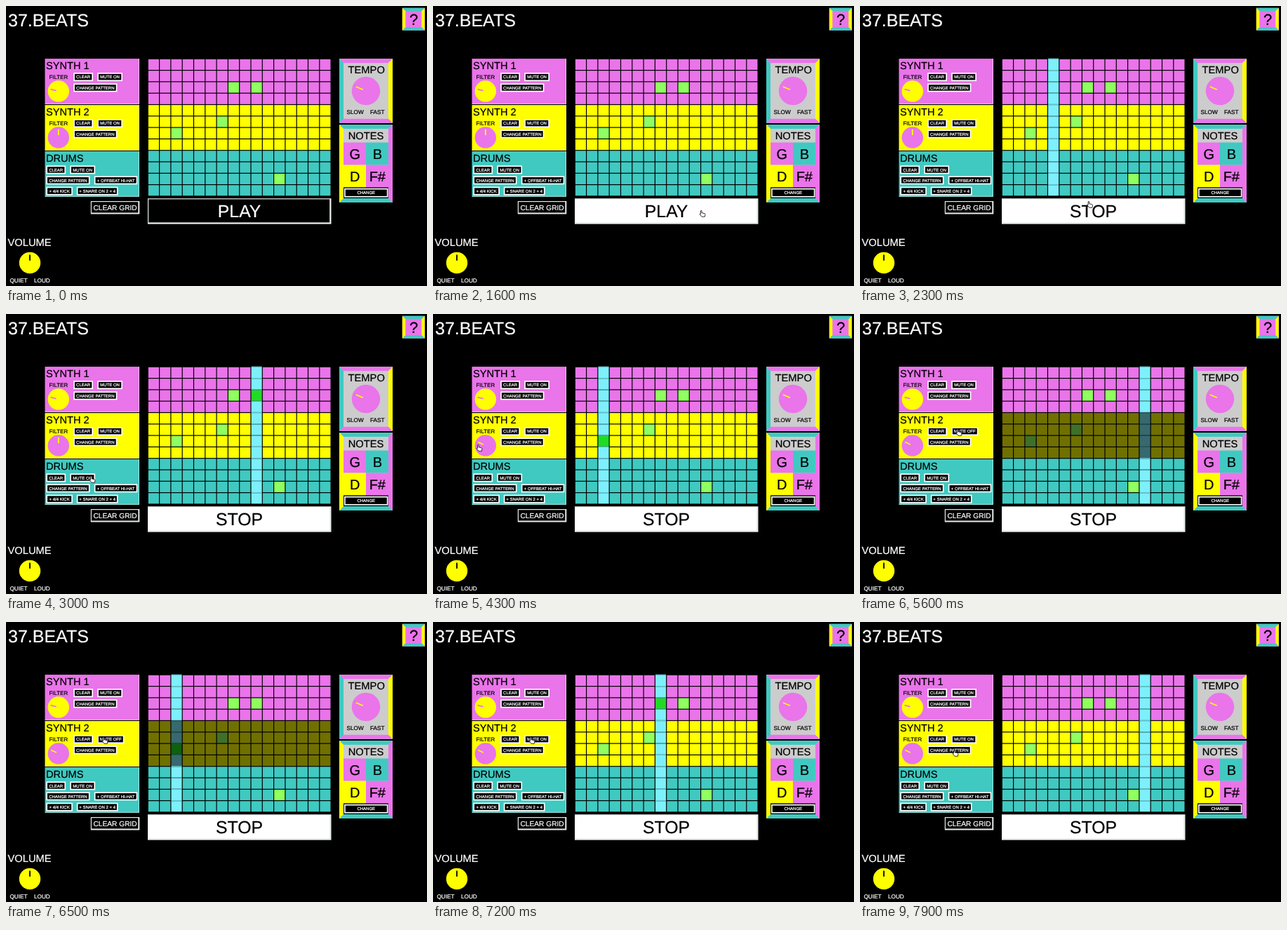
Write an HTML page that moves like this. It is 600 by 399 pixels and loops after 8 s.

```html
<!DOCTYPE html>
<html lang="en">
<head>
<meta charset="utf-8">
<title>Step sequencer</title>
<style>
  html, body { margin: 0; width: 100%; height: 100%; overflow: hidden; background: #000; }
  svg { display: block; width: 100%; height: 100%; }
  text {
    font-family: "Liberation Sans", Arial, sans-serif;
    text-rendering: geometricPrecision;
    stroke-width: .22px;
  }
</style>
</head>
<body>
<svg id="stage" viewBox="0 0 600 399"></svg>
<script>
const PINK = '#ea74ea', YELLOW = '#ffff00', TEAL = '#40c9c1', GREY = '#cccccc';
const NOTE = '#90ff60', HIT = '#1fdc22', BEAM = '#7df0fb';
const LOOP = 8000, TICK = 100;
const STEP = 140, PLAY_AT = 1660, MUTE_AT = 5200, UNMUTE_AT = 7000;
const stage = document.getElementById('stage');

function add(tag, attrs, parent = stage) {
  const el = document.createElementNS('http://www.w3.org/2000/svg', tag);
  for (const key in attrs) el.setAttribute(key, attrs[key]);
  parent.appendChild(el);
  return el;
}

const rect = (x, y, width, height, fill, parent) => add('rect', { x, y, width, height, fill }, parent);

function label(str, x, y, size, fill = '#000', anchor = 'start') {
  const el = add('text', { x, y, 'font-size': size, fill, stroke: fill, 'text-anchor': anchor });
  el.textContent = str;
  return el;
}

// Small black button with a white frame
const EDGE = 1.7;
function button(str, x, y, w, h = 12) {
  const frame = rect(x, y, w, h, '#fff');
  const face = rect(x + EDGE, y + EDGE, w - 2 * EDGE, h - 2 * EDGE, '#000');
  const text = label(str, x + w / 2, y + h / 2 + 2.2, 6, '#fff', 'middle');
  return { frame, face, text };
}

function panel(y, fill, title) {
  rect(55.5, y, 134.5, 64.8, fill);
  add('path', { d: `M189.5 ${y}v64.3H55.5`, fill: 'none', stroke: '#fff', 'stroke-opacity': 0.55 });
  label(title, 57, y + 14.5, 14.6);
}

function knob(cx, cy, r, fill, mark, angle) {
  add('circle', { cx, cy, r, fill });
  const needle = add('path', { d: `M0${-r * 0.76}V${-r * 0.22}`, stroke: mark, 'stroke-width': 1.8 });
  const turn = a => needle.setAttribute('transform', `translate(${cx} ${cy}) rotate(${a})`);
  turn(angle);
  return turn;
}

// Mitred frame: one colour per side, in CSS order
function bevel(x, y, w, h, b, colors) {
  const r = x + w, d = y + h;
  [
    [x, y, r, y, r - b, y + b, x + b, y + b],
    [r, y, r, d, r - b, d - b, r - b, y + b],
    [x, d, r, d, r - b, d - b, x + b, d - b],
    [x, y, x, d, x + b, d - b, x + b, y + b]
  ].forEach((points, i) => add('polygon', { points: points.join(' '), fill: colors[i] }));
}

function synth(y, title, knobFill, fill, mark, angle) {
  panel(y, fill, title);
  label('FILTER', 61.5, y + 28.8, 7.9);
  const turn = knob(74.8, y + 46.3, 15.2, knobFill, mark, angle);
  button('CLEAR', 96.2, y + 20, 27.8);
  const mute = button('MUTE ON', 130.2, y + 20, 35.8);
  button('CHANGE PATTERN', 96.2, y + 35.3, 62.2);
  return { turn, mute };
}

rect(0, 0, 600, 399, '#000');
label('37.BEATS', 3, 28.8, 25, '#fff');

rect(564.8, 2.8, 32, 32, PINK);
bevel(564.8, 2.8, 32, 32, 4.5, [TEAL, YELLOW, TEAL, YELLOW]);
label('?', 581, 27, 22, '#000', 'middle');

synth(75.1, 'SYNTH 1', YELLOW, PINK, PINK, -76);
const synth2 = synth(141.1, 'SYNTH 2', PINK, YELLOW, YELLOW, 0);

panel(207, TEAL, 'DRUMS');
button('CLEAR', 57.3, 227.4, 27.8);
button('MUTE ON', 91.3, 227.4, 35.8);
button('CHANGE PATTERN', 57.3, 242.3, 62.2);
button('+ OFFBEAT HI-HAT', 125.8, 242.3, 61.6);
button('+ 4/4 KICK', 57.3, 257.6, 37.6);
button('+ SNARE ON 2 + 4', 100.8, 257.6, 58.8);

rect(120.8, 278, 69.5, 18.5, '#e6ecea');
rect(122, 279.2, 66.3, 15.3, '#000');
label('CLEAR GRID', 155.6, 290.5, 10.2, '#fff', 'middle');

label('VOLUME', 2.5, 341.6, 14.7, '#fff');
knob(34, 366, 15.2, YELLOW, '#000', 0);
label('QUIET', 5.5, 394, 8.2, '#fff');
label('LOUD', 40, 394, 8.2, '#fff');

rect(475, 75.2, 76, 91.5, GREY);
bevel(475, 75.2, 76, 91.5, 6, [PINK, YELLOW, PINK, TEAL]);
label('TEMPO', 513.7, 95.6, 14.7, '#000', 'middle');
knob(513, 121, 20.2, PINK, YELLOW, -67);
label('SLOW', 485.5, 154, 8.2);
label('FAST', 519, 154, 8.2);

rect(475, 169, 76, 111, GREY);
bevel(475, 169, 76, 111, 6, [TEAL, PINK, TEAL, YELLOW]);
label('NOTES', 513, 190, 14.7, '#000', 'middle');
[['G', PINK], ['B', TEAL], ['D', YELLOW], ['F#', PINK]].forEach(([name, fill], i) => {
  const x = 481 + (i % 2) * 32, y = 194.5 + (i >> 1) * 32;
  rect(x, y, 32, 32, fill);
  label(name, x + 16.3, y + 23, 20, '#000', 'middle');
});
rect(481, 258.4, 64, 15.6, '#000');
button('CHANGE', 482, 259.8, 62.5, 12.8);

// Grid: three bands of four rows, sixteen columns
const PITCH = 16.3, GAP = 0.6, GX = 202.3, GY = 75.3;
const notes = new Set(['2,7', '2,9', '5,6', '6,2', '10,11']);
const bands = [PINK, YELLOW, TEAL].map(fill => ({ fill, g: add('g', {}) }));
const cells = [];
for (let row = 0; row < 12; row++) {
  const { fill, g } = bands[row >> 2];
  for (let col = 0; col < 16; col++) {
    const isNote = notes.has(row + ',' + col);
    const x = GX + col * PITCH, y = GY + row * PITCH, size = PITCH - 2 * GAP;
    const el = rect(x + GAP, y + GAP, size, size, isNote ? NOTE : fill, g);
    const edge = add('path', { d: `M${x + GAP} ${y}h${size}`, stroke: '#62c3cf', 'stroke-width': 1.3, visibility: 'hidden' }, g);
    cells.push({ el, edge, col, off: isNote ? NOTE : fill, on: isNote ? HIT : BEAM });
  }
}

rect(202, 274.2, 261.5, 36.5, '#e6ecea');
const playFace = rect(203.2, 275.4, 258, 33, '#000');
const playText = label('PLAY', 332.6, 300.6, 24.8, '#fff', 'middle');

const cursor = add('g', {});
const hand = add('path', {
  d: 'M-2.5-4.2q1-1 1.6 0v3l3.8.8q1.2.4 1 1.8l-.6 2.9h-4.2l-3-3.6q0-1.2 1.4-.4z',
  fill: '#fff', stroke: '#000', 'stroke-width': 0.8
}, cursor);
const arrow = add('path', {
  d: 'M-2-4.5v8l1.9-1.8 1.3 3 1.2-.5-1.3-2.9h2.6z',
  fill: '#000', stroke: '#fff', 'stroke-width': 0.7
}, cursor);

const route = [
  [0, 400, 415], [800, 400, 415], [1300, 384, 296], [2000, 384, 296],
  [3000, 123, 236], [3400, 76, 183], [3500, 76, 183], [4200, 66, 191],
  [4400, 66, 191], [5000, 141, 169], [7200, 141, 169], [7600, 136, 187], [8000, 136, 187]
];
const ease = p => p * p * (3 - 2 * p);
const ramp = (t, a, b) => ease(Math.min(1, Math.max(0, (t - a) / (b - a))));

function pointAt(t) {
  const i = route.findIndex(stop => stop[0] > t);
  const [t0, x0, y0] = route[i - 1], [t1, x1, y1] = route[i];
  const p = ramp(t, t0, t1);
  return [x0 + (x1 - x0) * p, y0 + (y1 - y0) * p];
}

function draw(t) {
  const [x, y] = pointAt(t);
  const playing = t >= PLAY_AT;
  const overPlay = x > 202 && x < 463 && y > 275 && y < 311;
  const overLeft = x < 190 && y < 272;
  const lit = playing || overPlay;

  cursor.setAttribute('transform', `translate(${x} ${y})`);
  hand.setAttribute('visibility', overPlay || overLeft ? 'visible' : 'hidden');
  arrow.setAttribute('visibility', overPlay || overLeft ? 'hidden' : 'visible');

  playFace.setAttribute('fill', lit ? '#fff' : '#000');
  playText.setAttribute('fill', lit ? '#000' : '#fff');
  playText.setAttribute('stroke', lit ? '#000' : '#fff');
  playText.textContent = playing ? 'STOP' : 'PLAY';

  const active = playing ? Math.floor((t - PLAY_AT) / STEP) % 16 : -1;
  for (const c of cells) {
    const on = c.col === active;
    c.el.setAttribute('fill', on ? c.on : c.off);
    c.edge.setAttribute('visibility', on ? 'visible' : 'hidden');
  }

  const muted = t >= MUTE_AT && t < UNMUTE_AT;
  const width = muted ? 38.3 : 35.8, { frame, face, text } = synth2.mute;
  bands[1].g.setAttribute('opacity', muted ? 0.44 : 1);
  frame.setAttribute('width', width);
  face.setAttribute('width', width - 2 * EDGE);
  text.setAttribute('x', 130.2 + width / 2);
  text.textContent = muted ? 'MUTE OFF' : 'MUTE ON';

  synth2.turn(-65 * ramp(t, 3500, 4200));
}

let start = null;
function loop(now) {
  if (start === null) start = now;
  draw(Math.floor(((now - start) % LOOP) / TICK) * TICK);
  requestAnimationFrame(loop);
}
draw(0);
requestAnimationFrame(loop);
</script>
</body>
</html>
```
